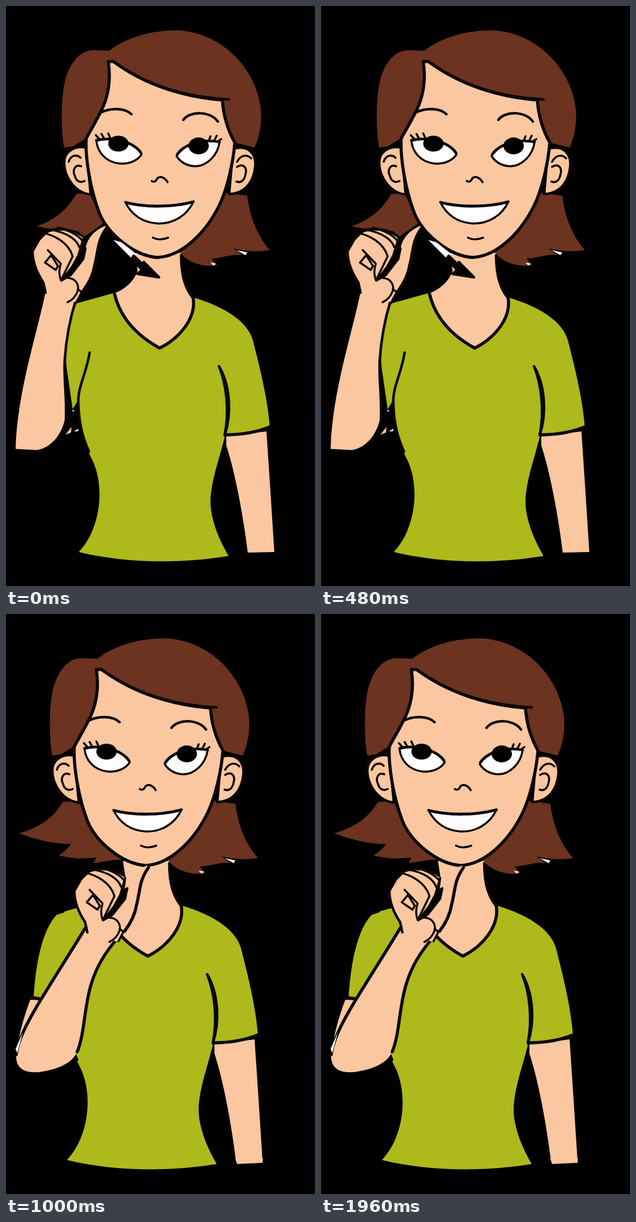
An HTML page without scripts for the animation above (2000 ms loop, 547x1024 px).

```html
<!DOCTYPE html>
<html lang="en">
<head>
<meta charset="utf-8">
<title>Thinking gesture</title>
<style>
  html, body { margin: 0; width: 100%; height: 100%; overflow: hidden; background: #000; }
  svg { display: block; width: 100vw; height: 100vh; }
  .hair { fill: #6b3320; }
  .skin { fill: #fbc7a0; }
  .shirt { fill: #aeb91b; }
  .white { fill: #fdfdfd; }
  .ink { stroke: #0b0706; stroke-width: 4.5; stroke-linecap: round; stroke-linejoin: round; }
  .line { fill: none; }
  .thin { stroke-width: 3.6; }
  .bold { stroke-width: 5.5; }
  .figure { animation: shift 2s step-end infinite; }
  .hand { animation: reach 2s step-end infinite; }
  .away { animation: first 2s step-end infinite; }
  .chin { animation: second 2s step-end infinite; }
  @keyframes shift { 0% { transform: none; } 50%, 100% { transform: translate(-21px, 0); } }
  @keyframes reach { 0% { transform: none; } 50%, 100% { transform: translate(74px, 56px); } }
  @keyframes first { 0% { visibility: visible; } 50%, 100% { visibility: hidden; } }
  @keyframes second { 0% { visibility: hidden; } 50%, 100% { visibility: visible; } }
</style>
</head>
<body>
<svg viewBox="0 0 547 1024" preserveAspectRatio="none">
  <rect width="547" height="1024"/>

  <g class="figure">
    <!-- lower hair -->
    <path class="hair away" d="M124 332C108 360 86 378 54 389L75 393 100 391 128 398 139 407 172 384 148 330Z"/>
    <path class="hair chin" d="M121 332C106 360 78 378 44 387C76 399 106 406 136 406C130 415 123 421 114 426C138 433 160 432 181 430L176 440 214 434 230 434C190 410 165 375 150 330Z"/>
    <path class="hair" d="M390 330L427 335C432 375 445 405 467 431C445 434 430 434 403 428L419 440C400 437 385 445 364 446L374 458C350 461 328 455 312 440L300 425 360 340Z"/>
    <path class="white" d="M408 431L427 435 424 440ZM362 453L372 455 367 458Z"/>

    <!-- arm, neck, shirt -->
    <path class="skin" d="M390 760L461 751 467 840 475 964 428 965C420 900 406 825 390 776Z"/>
    <path class="skin chin" d="M427 962L476 962 475 969 430 971Z"/>
    <path class="skin" d="M228 436H310C309 475 318 500 333 516C337 550 306 588 272 604C230 585 205 550 190 508C212 500 226 486 233 468Z"/>
    <path class="shirt" d="M190 507L125 525C108 560 102 610 109 650L118 712 128 695C128 740 138 772 154 804C170 840 168 885 156 918C149 938 141 950 129 964C210 984 310 985 394 971C373 935 361 900 362 870C365 830 378 800 388 757C420 757 445 752 467 743C463 690 447 630 437 590C425 550 373 527 333 515C337 550 306 588 272 604C230 585 205 550 190 507Z"/>
    <path class="line ink bold" d="M192 508C202 550 232 582 272 604C308 586 338 550 331 514"/>
    <path class="line ink" d="M310 440C310 478 318 500 332 517"/>
    <path class="line ink" d="M148 612C142 650 127 672 128 700C129 740 137 765 147 787"/>
    <path class="ink" d="M377 636C390 668 396 714 387 758C400 720 397 670 377 636Z"/>
    <path class="line ink bold" d="M389 757C420 757 445 752 467 743"/>

    <!-- head -->
    <path class="hair" d="M103 250C97 220 97 160 105 130C115 94 135 78 155 78L183 79C215 53 265 42 305 43C382 47 442 110 451 180C454 212 446 237 440 250L404 241 300 220 180 210 118 248Z"/>
    <g class="skin ink">
      <path d="M142 250C122 246 102 256 103 278C104 304 123 330 150 333Z"/>
      <path d="M402 252C430 244 444 262 441 285C438 310 424 331 395 332Z"/>
      <path class="bold" d="M181 98C187 138 178 168 166 190C156 210 148 222 142 234C140 265 148 320 165 365C180 402 226 441 268 444C312 442 353 400 376 355C393 322 403 270 405 241C392 218 385 195 383 166C308 160 244 137 190 98Z"/>
    </g>
    <path class="ink" d="M190 98C246 140 312 161 394 165C308 160 244 137 190 98Z"/>
    <g class="line ink thin">
      <path d="M111 275C115 262 126 262 132 268M133 283C122 278 117 291 122 300C124 309 131 313 139 309"/>
      <path d="M409 275C416 262 427 262 434 269M409 284C421 277 427 286 424 297C422 308 416 313 408 310"/>
    </g>
    <g class="line ink">
      <path d="M168 188C184 180 210 179 222 191M314 201C325 185 362 185 375 204"/>
      <path class="thin" d="M258 309Q264 313 268 304C274 299 282 304 286 311M260 409Q272 415 287 409"/>
      <path class="thin" d="M159 228L167 237M169 226L175 236M181 225L185 234M362 230L359 238M373 229L368 239M381 235L372 241"/>
    </g>
    <g class="white ink thin">
      <path d="M160 238C185 231 225 238 240 262C232 274 216 280 200 278C176 275 162 258 160 238Z"/>
      <path d="M302 265C314 245 345 234 378 240C375 264 355 283 335 283C316 282 307 273 302 265Z"/>
      <path d="M211 346C245 355 295 355 332 345C320 371 295 385 268 384C241 382 222 368 211 346Z"/>
    </g>
    <path class="line ink" d="M160 237C185 231 225 238 239 259M303 262C314 245 345 234 378 240M212 347C245 356 295 356 331 346"/>
    <ellipse cx="199" cy="243" rx="18" ry="14"/>
    <ellipse cx="341" cy="247" rx="18" ry="15"/>
  </g>

  <!-- raised arm, away from the face -->
  <g class="away">
    <path class="skin" d="M71 500C55 580 20 680 17 782L54 784C84 780 105 748 106 715C107 690 102 650 104 620C107 580 114 548 123 521Z"/>
    <path class="line ink" d="M106 730C108 690 102 660 104 625C107 580 114 550 123 521"/>
    <path class="skin" d="M105 757L116 743 115 753Z"/>
    <path class="white" d="M117 713L121 714 119 717ZM120 751L129 746 127 751Z"/>
    <path class="white" d="M190 413L204 417 231 438 223 446Z"/>
    <path class="ink" d="M226 441L246 460 244 452 271 479 233 473 241 466 222 447Z"/>
  </g>

  <!-- raised arm, at the chin -->
  <g class="chin">
    <path class="shirt" d="M125 520L90 531C66 555 53 610 49 675L66 681 150 555Z"/>
    <path class="skin" d="M43 681L64 682 20 770C22 742 34 705 43 681Z"/>
    <path class="line ink bold" d="M43 677L66 680"/>
    <path class="skin" d="M140 552C115 594 75 660 45 706C28 738 16 766 18 784C20 803 33 810 56 809C92 805 119 792 126 772C140 740 138 690 152 650C162 618 182 590 201 570Z"/>
    <path class="line ink bold" d="M140 555C114 598 80 650 55 692C35 726 22 752 18 778"/>
    <path class="line ink bold" d="M126 773C140 740 138 690 152 650C162 618 180 592 198 572"/>
    <path class="white" d="M17 768L30 738 20 775Z"/>
  </g>

  <g class="hand">
    <path class="skin" d="M70 507L66 489C54 470 47 450 47 433L59 412 72 399C88 391 116 393 135 406L138 416 133 434 140 432C143 411 155 397 176 388L178 394C162 416 158 431 157 458C152 486 140 496 124 523Z"/>
    <path class="line ink bold" d="M178 392C161 416 164 432 157 458C154 478 145 492 136 504"/>
    <path class="line ink" d="M70 506L66 488C54 470 47 450 47 433L59 412 72 399C88 391 116 393 135 406"/>
    <path class="ink thin" d="M137 410L134 432 141 428 137 447 115 475 98 485 117 460 128 440Z"/>
    <g class="line ink thin">
      <path d="M62 400C86 404 111 418 118 442L98 483M80 395C105 400 124 410 130 426M92 391C110 396 126 403 135 414"/>
      <path d="M74 431L97 455Q92 470 97 484M69 453L80 440 92 459 88 466 69 453M108 480C122 480 130 491 127 503Q122 517 109 523M127 500L134 505 125 522"/>
    </g>
  </g>
</svg>
</body>
</html>
```
